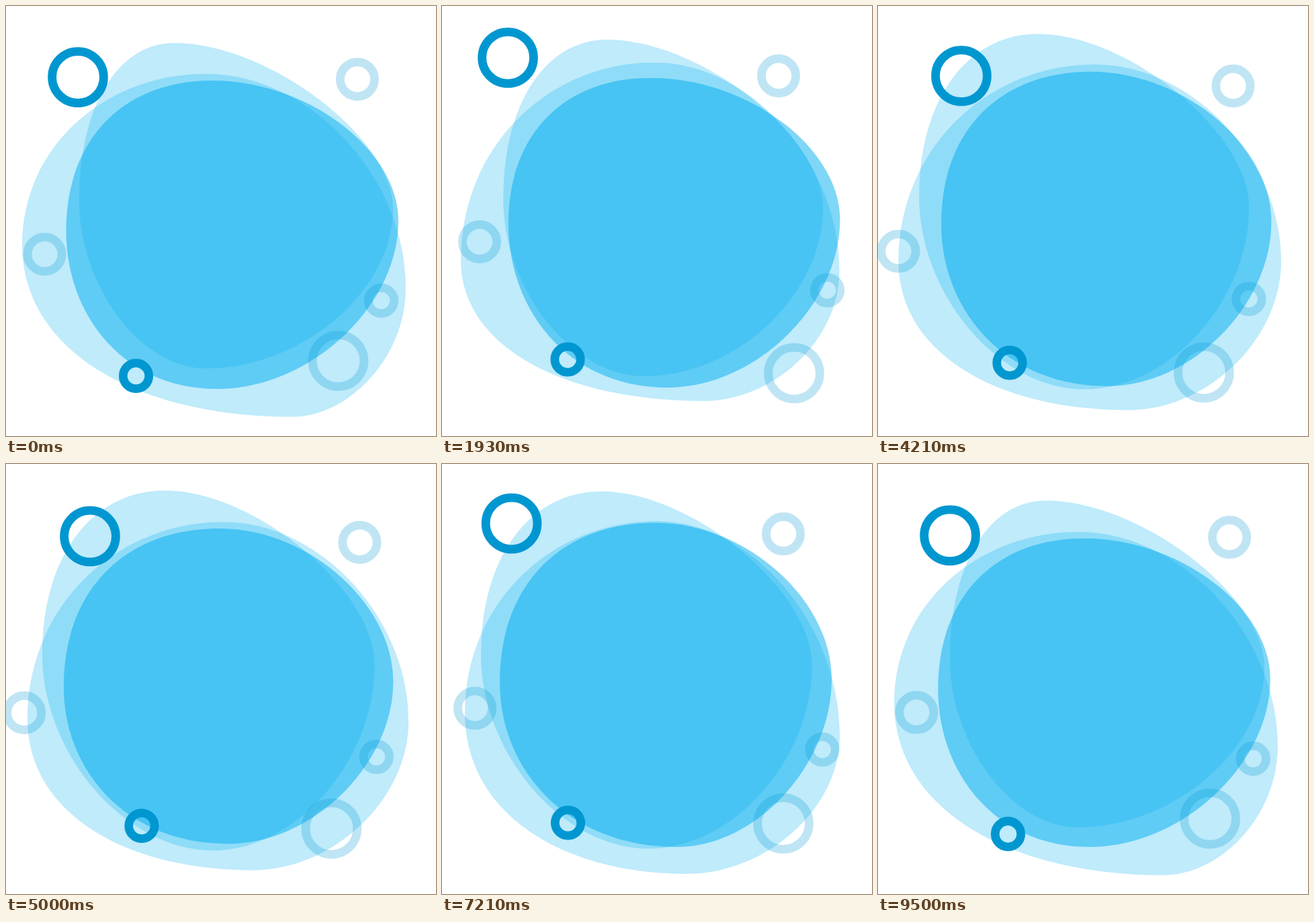
Recreate the animation shown at these times as an HTML page. Size 640 by 640 pixels, loop 9570 ms.

```html
<!DOCTYPE html>
<html lang="en">
<head>
<meta charset="utf-8">
<title>Blobs and rings</title>
<style>
html, body { margin: 0; width: 100%; height: 100%; overflow: hidden; background: #fff; }
svg { display: block; width: 100vw; height: 100vh; }
</style>
</head>
<body>
<svg id="stage" viewBox="0 0 640 640"></svg>
<script>
const LOOP = 9570;
const SVG = 'http://www.w3.org/2000/svg';
const stage = document.getElementById('stage');

// Smooth closed motion through a few poses
function tour(times, poses) {
  const n = times.length;
  const time = i => times[(i + n) % n] + LOOP * Math.floor(i / n);
  const pose = i => poses[(i + n) % n];
  const speed = (i, k) => {
    const h0 = time(i) - time(i - 1), h1 = time(i + 1) - time(i);
    const s0 = (pose(i)[k] - pose(i - 1)[k]) / h0;
    const s1 = (pose(i + 1)[k] - pose(i)[k]) / h1;
    return (s0 * h1 + s1 * h0) / (h0 + h1);
  };
  return t => {
    let i = 0;
    while (t >= time(i + 1)) i++;
    const h = time(i + 1) - time(i), u = (t - time(i)) / h, v = 1 - u;
    return pose(i).map((p, k) =>
      p * v * v * (1 + 2 * u) + pose(i + 1)[k] * u * u * (3 - 2 * u)
      + h * u * v * (speed(i, k) * v - speed(i + 1, k) * u));
  };
}

// Out from one pose to another and back, turning late in the loop
function sway(from, to) {
  return t => {
    const s = Math.sin(Math.PI * (t / LOOP) ** 1.45);
    return from.map((p, k) => p + (to[k] - p) * s);
  };
}

// A pose holds x, y of the top, right, bottom and left extremes.
// Grips are handle lengths as shares of each quadrant, clockwise from the top.
const blobs = [
  {
    alpha: 0.25,
    grips: [.52, .52, .53, .51, .57, .62, .56, .56],
    pose: tour([0, 1930, 4210, 7210], [
      [298, 101, 595, 420, 425, 611.5, 24, 355],
      [316, 84, 591.5, 395, 390, 588, 28, 378],
      [323, 87, 600, 380, 373, 601.5, 30.5, 380],
      [320, 85, 592, 405, 365, 610, 34, 370]
    ])
  },
  {
    alpha: 0.25,
    grips: [.43, .43, .51, .52, .52, .5, .61, .58],
    pose: sway(
      [250, 55, 576, 302, 297, 539.5, 109, 290],
      [235, 38.5, 547, 299, 309, 577.5, 50.5, 283]
    )
  },
  {
    alpha: 0.5,
    grips: [.51, .51, .51, .51, .62, .53, .61, .61],
    pose: tour([0, 3290, 5790, 7210], [
      [307, 111, 584, 320, 314, 570, 89.5, 335],
      [315, 100, 593.5, 318, 350, 566.5, 101, 318],
      [319, 93.5, 572, 325, 328, 566, 81.5, 335],
      [318, 87.5, 580, 320, 350, 570, 86, 325]
    ])
  }
];

const stops = [0, 1930, 3290, 4210, 5790, 7210];
const ring = (r, alpha, ...path) => ({ r, alpha, at: tour(stops, path) });
const rings = [
  ring(38.4, 1, [107, 106], [98, 77], [107, 82], [124, 104], [119, 103], [103.5, 88.5]),
  ring(25.6, .25, [523, 109], [501, 104], [511, 111], [528.5, 119], [518, 111], [508, 104]),
  ring(25.6, .25, [57.5, 369.5], [56, 351], [47, 352], [30.5, 365], [31, 371], [49, 363.5]),
  ring(19.2, 1, [193.5, 550.5], [187, 526], [186, 519.5], [196, 531], [203, 542], [187.5, 534]),
  ring(19.2, .25, [558.5, 438.5], [573.5, 423], [568, 424.5], [552, 436], [556.5, 431.5], [566, 425]),
  ring(38.4, .25, [494.5, 528], [524, 546.5], [506, 547.5], [485, 545.5], [492, 539.5], [508, 535])
];

function add(tag, attrs) {
  const el = document.createElementNS(SVG, tag);
  for (const name in attrs) el.setAttribute(name, attrs[name]);
  return stage.appendChild(el);
}

function outline([tx, ty, rx, ry, bx, by, lx, ly], g) {
  const curve = (...n) => 'C' + n.map(v => v.toFixed(2)).join(' ');
  return `M${tx} ${ty}`
    + curve(tx + g[0] * (rx - tx), ty, rx, ry - g[1] * (ry - ty), rx, ry)
    + curve(rx, ry + g[2] * (by - ry), bx + g[3] * (rx - bx), by, bx, by)
    + curve(bx - g[4] * (bx - lx), by, lx, ly + g[5] * (by - ly), lx, ly)
    + curve(lx, ly - g[6] * (ly - ty), tx - g[7] * (tx - lx), ty, tx, ty) + 'Z';
}

for (const b of blobs) b.el = add('path', { fill: '#00aeef', 'fill-opacity': b.alpha });
for (const c of rings) {
  c.el = add('circle', {
    r: c.r, fill: 'none', stroke: '#0097d1', 'stroke-width': 12.8, 'stroke-opacity': c.alpha
  });
}

function draw(t) {
  for (const b of blobs) b.el.setAttribute('d', outline(b.pose(t), b.grips));
  for (const c of rings) {
    const [x, y] = c.at(t);
    c.el.setAttribute('cx', x);
    c.el.setAttribute('cy', y);
  }
}

const start = performance.now();
function tick() {
  draw((performance.now() - start) % LOOP);
  requestAnimationFrame(tick);
}
tick();
</script>
</body>
</html>
```
